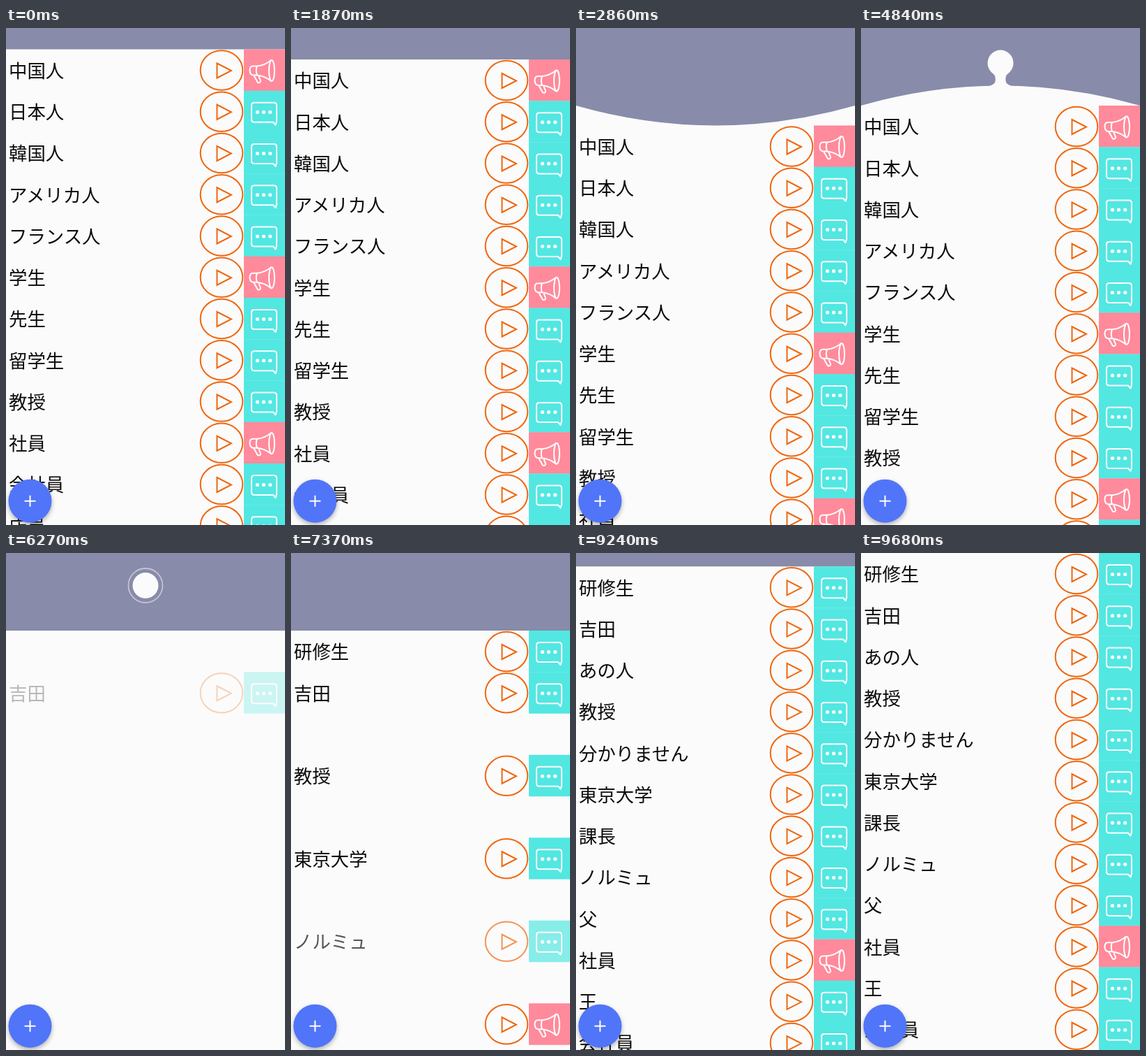
These frames come from a looping animation (400 by 711 pixels, 9790 ms). An HTML page:

```html
<!DOCTYPE html>
<html lang="ja">
<head>
<meta charset="utf-8">
<title>Pull to refresh</title>
<style>
  html, body { margin: 0; width: 100%; height: 100%; overflow: hidden; background: #fbfbfb; }
  svg { display: block; width: 400px; height: 711px; }
  text { font: 26.4px "Noto Sans CJK JP", "Noto Sans CJK", "Noto Sans", sans-serif; fill: #0c0c0c; }
  .line { fill: none; stroke: #fff; stroke-width: 2; stroke-linecap: round; stroke-linejoin: round; }
  .play { fill: none; stroke: #f0670f; stroke-width: 2; }
  .fab { filter: drop-shadow(0 3px 3px rgba(0, 0, 0, .3)); }
</style>
</head>
<body>
<svg viewBox="0 0 400 711">
  <defs>
    <g id="play" class="play">
      <ellipse cx="309" cy="30" rx="30.3" ry="28.2"/>
      <path d="M302.5 20V41L323 30.5Z"/>
    </g>
    <g id="chat">
      <path fill="#53e7e2" d="M341 0h59v59.5h-59z"/>
      <path class="line" d="M356 17H384Q388 17 388 21V44L386.500 49L383 45H356Q352 45 352 41V21Q352 17 356 17Z"/>
      <g fill="#fff"><circle cx="360.5" cy="30.5" r="2.6"/><circle cx="369.5" cy="30.5" r="2.6"/><circle cx="378.7" cy="30.5" r="2.6"/></g>
    </g>
    <g id="horn">
      <path fill="#ff8a9b" d="M341 0h59v59.5h-59z"/>
      <g class="line">
        <ellipse cx="381" cy="30.500" rx="4" ry="15"/>
        <path d="M380 15.500Q371 23 360 24H354Q349.500 24 349.500 30T354 37H360Q371 38 380 45.500M360 24Q357.500 30 360 37M355 37L361 47.500Q365 48.500 365 45L362 37.500"/>
      </g>
    </g>
  </defs>
  <path id="head" fill="#888ba9"/>
  <g fill="#fbfbfb">
    <circle id="ball" cx="200" r="18.5"/>
    <path id="blob"/>
  </g>
  <path id="ring" fill="none" stroke="#fbfbfb" stroke-width="1.8"/>
  <g id="before"></g>
  <g id="after"></g>
  <g class="fab">
    <circle cx="34.5" cy="676.700" r="31" fill="#5075f9"/>
    <path d="M26.500 676.700h16M34.500 668.700v16" stroke="#fff" stroke-width="2"/>
  </g>
</svg>
<script>
const LOOP = 9790, TICK = 110;
const ROW = 59.25, HEAD = 111, BULGE = 28.5, R = 18.5, REST = 46.5;
const RELEASE = 4030, SPRING = 4270, POP = 4543, OUT = 4873, SPIN = 5060, DONE = 6120;
const SWAP = 6213, FADE = 203.5, CLOSE = 8960;

const $ = id => document.getElementById(id);
const clamp = x => Math.min(1, Math.max(0, x));
const part = (t, from, to) => clamp((t - from) / (to - from));

// Rows marked with * carry the horn icon.
const before = '中国人* 日本人 韓国人 アメリカ人 フランス人 学生* 先生 留学生 教授 社員* 会社員 店員';
const after = '研修生 吉田 あの人 教授 分かりません 東京大学 課長 ノルミュ 父 社員* 王 会社員';
const fadeOrder = [1, 5, 9, 3, 0, 7, 10, 2, 6, 4, 8, 11];

function fill(id, words) {
  $(id).innerHTML = words.split(' ').map((word, i) => {
    const icon = word.endsWith('*') ? 'horn' : 'chat';
    return `<g transform="translate(0 ${i * ROW})"><text x="4" y="40.3">${word.replace('*', '')}</text>` +
      `<use href="#play"/><use href="#${icon}"/></g>`;
  }).join('');
}
fill('before', before);
fill('after', after);
const newRows = [...$('after').children];

// Piecewise linear pull of the finger: [time, list top]
const pull = [[1760, 30.5], [1870, 45], [2200, 93], [2420, 113], [2640, 130], [2860, HEAD + BULGE]];

function listTop(t) {
  if (t <= pull[0][0]) return pull[0][1];
  for (let i = 1; i < pull.length; i++) {
    const [a, ya] = pull[i - 1], [b, yb] = pull[i];
    if (t <= b) return ya + (yb - ya) * part(t, a, b);
  }
  if (t < CLOSE) return HEAD + BULGE * (1 - part(t, RELEASE, SPRING));
  return HEAD * (1 - part(t, CLOSE, CLOSE + 480)) ** 2;
}

// Offset of the middle of the header's lower edge
function bend(t, top) {
  if (t < SPRING) return Math.max(0, top - HEAD);
  return -BULGE * part(t, SPRING, POP) * (1 - part(t, OUT, SPIN));
}

function tail(cy, base) {
  const y = cy + R * .8, mid = (y + base) / 2;
  if (y >= base) return '';
  const p = clamp((base - cy) / (2 * R));
  const w = R * (1 - p) + 6 * p, e = R * .6;
  return `M${200 - R} ${base}Q${200 - w} ${base - 2} ${200 - w} ${mid}Q${200 - w} ${y + 2} ${200 - e} ${y}` +
    `H${200 + e}Q${200 + w} ${y + 2} ${200 + w} ${mid}Q${200 + w} ${base - 2} ${200 + R} ${base}Z`;
}

const bump = (half, y, h) => `M${200 - half} ${y}Q200 ${y - h} ${200 + half} ${y}Z`;

function arc(start, sweep, r) {
  const at = deg => {
    const a = deg * Math.PI / 180;
    return `${200 + r * Math.cos(a)} ${REST + r * Math.sin(a)}`;
  };
  const half = start + sweep / 2;
  return `M${at(start)}A${r} ${r} 0 0 1 ${at(half)}A${r} ${r} 0 0 1 ${at(start + sweep)}`;
}

function spinner(t) {
  const n = (t - SPIN) / (1000 / 60), m = n - 39;
  return m < 0 ? arc(90 + 3 * n, 7 * n, 22.5) : arc(207 + 10 * m, 273 - 7 * m, 22.5);
}

function ballState(t) {
  const s = { y: null, blob: '', ring: '', alpha: 1 };
  if (t < SPRING) return s;
  if (t < POP) {
    const k = part(t, SPRING, POP), y = HEAD - BULGE * k;
    if (k > .5) s.y = y;
    else s.blob = bump(2 * R - k * R, y + 1, 2 * R * k);
  } else if (t < OUT) {
    const base = HEAD - BULGE;
    s.y = base - (base - REST) * part(t, POP, OUT);
    s.blob = tail(s.y, base + 1);
  } else if (t < DONE) {
    s.y = REST;
    if (t > SPIN) s.ring = spinner(t);
  } else {
    const k = (t - DONE) / 1000;
    if (k < .3) {
      s.y = REST;
      s.ring = arc(0, 360, R + 4 * (1 + k / .3));
      s.alpha = 1 - k / .3;
    } else if (k < .7) {
      s.y = REST + (HEAD - REST) * (k - .3) / .4;
      if (s.y > HEAD - 2 * R) s.blob = tail(s.y, HEAD + 1);
    } else if (k < 1) {
      const f = (k - .7) / .3;
      s.blob = bump(R + 2 * R * f, HEAD + 1, R * (1 - f));
    }
  }
  return s;
}

function draw(t) {
  const top = listTop(t), base = Math.min(top, HEAD);
  $('head').setAttribute('d', `M0 0V${base}Q200 ${base + 2 * bend(t, top)} 400 ${base}V0Z`);

  const s = ballState(t);
  $('ball').setAttribute('visibility', s.y === null ? 'hidden' : 'visible');
  $('ball').setAttribute('cy', s.y ?? 0);
  $('blob').setAttribute('d', s.blob);
  $('ring').setAttribute('d', s.ring);
  $('ring').setAttribute('opacity', s.alpha);

  const swapped = t >= SWAP;
  $('before').style.display = swapped ? 'none' : '';
  $('after').style.display = swapped ? '' : 'none';
  $(swapped ? 'after' : 'before').setAttribute('transform', `translate(0 ${top})`);
  fadeOrder.forEach((row, i) => {
    const from = SWAP + i * FADE;
    newRows[row].setAttribute('opacity', part(t, from, from + FADE));
  });
}

const began = performance.now();
function loop() {
  const t = (performance.now() - began) % LOOP;
  draw(Math.floor(t / TICK) * TICK);
  requestAnimationFrame(loop);
}
loop();
</script>
</body>
</html>
```
